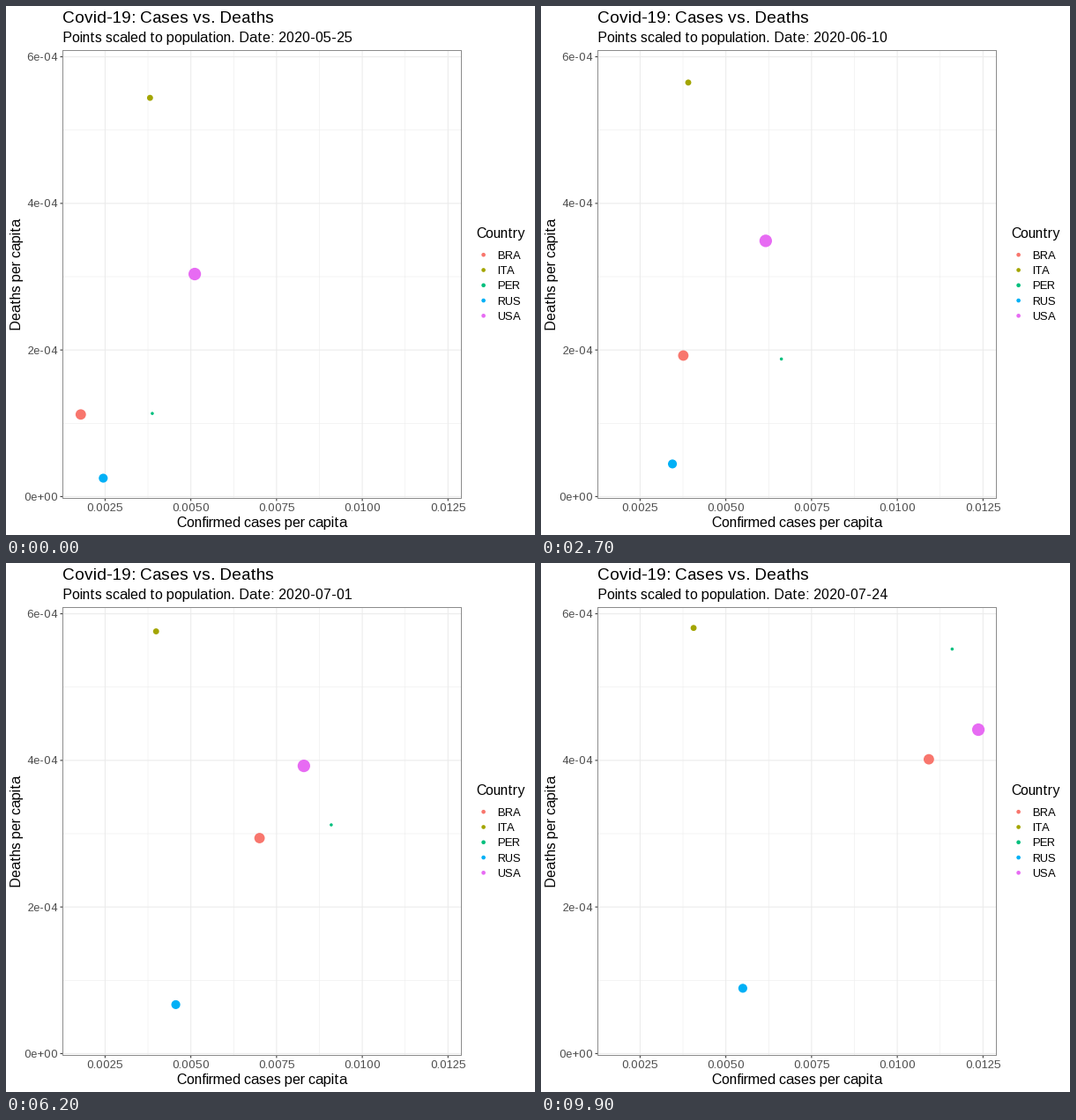
A matplotlib script for the animation above (10 s loop, 600 by 600 pixels).

```python
import numpy as np
import matplotlib.pyplot as plt
from matplotlib.animation import FuncAnimation
from matplotlib.patches import Circle

FRAMES, INTERVAL, DAYS = 100, 100, 60
START = np.datetime64("2020-05-25")
LEFT, RIGHT, TOP, BOTTOM = 64.5, 516.5, 50.5, 558.5

# Whole-pixel letter spacing
plt.rcParams.update({"font.family": "Liberation Sans",
                     "text.hinting_factor": 1})

# Each path passes these frames and rests after the last one
KEYS = np.array([0, 27, 50, 73, 97])

# Colour, population in millions, weekend lag in days,
# then cases per thousand and deaths per ten thousand at the keys
COUNTRIES = {
    "BRA": ("#F8766D", 209, 0.4, [1.79, 3.76, 5.77, 8.18, 10.92],
            [1.12, 1.924, 2.597, 3.245, 4.015]),
    "ITA": ("#A3A500", 60, 0, [3.81, 3.904, 3.963, 4.007, 4.06],
            [5.44, 5.649, 5.735, 5.777, 5.807]),
    "PER": ("#00BF7D", 32, 0, [3.876, 6.62, 8.336, 9.78, 11.6],
            [1.134, 1.877, 2.711, 3.48, 4.36]),
    "RUS": ("#00B0F6", 144, 0.15, [2.446, 3.443, 4.219, 4.843, 5.495],
            [0.251, 0.445, 0.592, 0.737, 0.891]),
    "USA": ("#E76BF3", 327, 0.25, [5.114, 6.163, 7.358, 9.354, 12.364],
            [3.036, 3.489, 3.79, 4.048, 4.419]),
}
BACKLOG = {"PER": 1.159}  # deaths reported late, all on the last step


def px(cases):
    return 112.4 + (cases - 2.5) * 38.895


def py(deaths):
    return 556.4 - deaths * 83.13


def radius(size):
    return 0.375 * (2.845 * size + 0.945) + 0.354


def clock(frames, lag):
    """Day number, running slower over each weekend."""
    day = np.minimum(frames, KEYS[-1]) * DAYS / (FRAMES - 1)
    return day + lag * np.sin(2 * np.pi * (day - 2.5) / 7)


def curve(values, lag):
    fit = np.polyfit(clock(KEYS, lag), values, len(KEYS) - 1)
    return np.polyval(fit, clock(np.arange(FRAMES), lag))


fig = plt.figure(figsize=(6, 6), dpi=100, facecolor="white")
ax = fig.add_axes([0, 0, 1, 1])
ax.set(xlim=(0, 600), ylim=(600, 0))
ax.axis("off")


def line(x, y, color, width):
    ax.plot(x, y, color=color, lw=width * 0.72, solid_capstyle="butt",
            snap=False)


def text(x, y, s, size, color="black", ha="left", **kw):
    return ax.text(x, y, s, fontsize=size * 0.72, color=color, ha=ha,
                   va="baseline", **kw)


def dot(x, y, r, color):
    return ax.add_patch(Circle((x, y), r, fc=color, ec="none", zorder=4))


def grid(xs, ys, width):
    for v in xs:
        line([px(v)] * 2, [TOP, BOTTOM], "#EBEBEB", width)
    for v in ys:
        line([LEFT, RIGHT], [py(v)] * 2, "#EBEBEB", width)


x_ticks = np.arange(1, 6) * 2.5
y_ticks = np.arange(4) * 2
grid(x_ticks[:-1] + 1.25, y_ticks[:-1] + 1, 0.53)
grid(x_ticks, y_ticks, 1.07)

for v in x_ticks:
    line([px(v)] * 2, [558.7, 561.4], "#333333", 1.07)
    text(px(v), 573.3, f"{v / 1000:.4f}", 12.8, "#4D4D4D", "center")
for v in y_ticks:
    line([61.5, 64.2], [py(v)] * 2, "#333333", 1.07)
    text(59.3, py(v) + 4.6, f"{v}e-04" if v else "0e+00", 12.8, "#4D4D4D",
         "right")
line([LEFT, RIGHT, RIGHT, LEFT, LEFT], [TOP, TOP, BOTTOM, BOTTOM, TOP],
     "#8C8C8C", 1)

text(64, 19, "Covid-19: Cases vs. Deaths", 19.2)
subtitle = text(64, 41, "", 16)
text(290.3, 591, "Confirmed cases per capita", 16, ha="center")
text(17, 304.5, "Deaths per capita", 16, ha="center", rotation=90,
     rotation_mode="anchor")
text(533, 263, "Country", 16)

pops = [c[1] for c in COUNTRIES.values()]
tracks = []
for i, (code, (color, pop, lag, cases, deaths)) in enumerate(
        COUNTRIES.items()):
    y = 282.2 + 17.28 * i
    dot(541.6, y, radius(1.5), color)
    text(557.5, y + 4.6, code, 12.8)
    share = (pop - min(pops)) / (max(pops) - min(pops))
    ys = curve(deaths, lag)
    ys[KEYS[-1]:] += BACKLOG.get(code, 0)
    tracks.append((dot(0, 0, radius(1 + 5 * share ** 0.5), color),
                   px(curve(cases, lag)), py(ys)))


def update(i):
    date = START + i * DAYS // (FRAMES - 1)
    subtitle.set_text(f"Points scaled to population. Date: {date}")
    for point, xs, ys in tracks:
        point.center = xs[i], ys[i]
    return [subtitle] + [t[0] for t in tracks]


anim = FuncAnimation(fig, update, frames=FRAMES, interval=INTERVAL,
                     repeat=True, repeat_delay=0)
plt.show()
```
